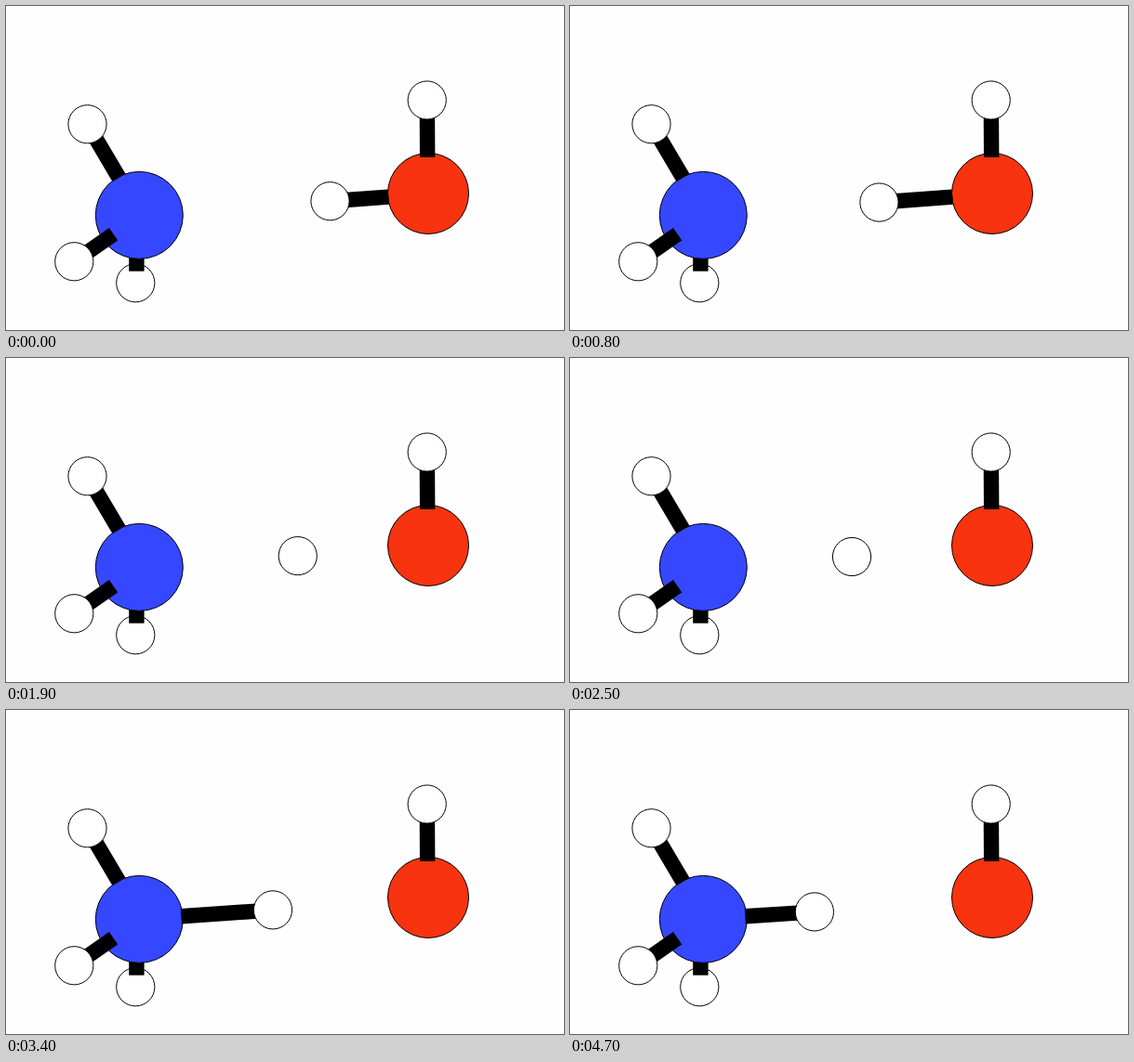
Recreate the animation shown at these times as an HTML page. Size 600 by 349 pixels, loop 4900 ms.

```html
<!DOCTYPE html>
<html lang="en">
<head>
<meta charset="utf-8">
<title>Proton transfer</title>
<style>
  html, body { margin: 0; width: 100%; height: 100%; overflow: hidden; background: #fefdff; }
  svg { display: block; width: 100%; height: 100%; }
  circle { fill: #fff; stroke: #000; stroke-width: 1; }
  line { stroke: #000; stroke-width: 16.4; }
  .nitrogen { fill: #3648ff; }
  .oxygen { fill: #f8330f; }
</style>
</head>
<body>
<svg viewBox="0 0 600 349">
  <!-- ammonia -->
  <circle cx="139.3" cy="298.3" r="20.6"/>
  <line x1="140.4" y1="260" x2="140.4" y2="285.7"/>
  <circle class="nitrogen" cx="143.3" cy="225.4" r="47"/>
  <line x1="87.5" y1="127.3" x2="121.5" y2="185"/>
  <circle cx="87.5" cy="127.3" r="20.6"/>
  <line x1="73.3" y1="275.3" x2="115.6" y2="245.7"/>
  <circle cx="73.3" cy="275.3" r="20.6"/>

  <!-- water -->
  <circle class="oxygen" cx="454" cy="202" r="43.5"/>
  <line x1="452.8" y1="101.5" x2="453.2" y2="163"/>
  <circle cx="452.7" cy="101.5" r="20.6"/>

  <!-- moving proton -->
  <line id="oldBond" x1="411.3" y1="205.6"/>
  <line id="newBond" x1="188.3" y1="222.2"/>
  <circle id="proton" r="20.6"/>
</svg>
<script>
  const LOOP = 4900, TICK = 100;
  const BREAK = 1900, FORM = 3200;
  const [proton, oldBond, newBond] =
    ['proton', 'oldBond', 'newBond'].map(id => document.getElementById(id));

  // Two moves, then one rest; the first rest comes a tick late.
  function movesAt(t) {
    const tick = Math.floor(t / TICK);
    return tick === 3 ? 3 : tick - Math.floor(tick / 3);
  }

  function attach(bond, x, y, visible) {
    bond.setAttribute('x2', x);
    bond.setAttribute('y2', y);
    bond.setAttribute('visibility', visible ? 'visible' : 'hidden');
  }

  function draw(t) {
    const n = movesAt(t);
    const x = 348.5 - 2.675 * n;
    const y = 210.2 + 0.225 * n;
    proton.setAttribute('cx', x);
    proton.setAttribute('cy', y);
    attach(oldBond, x, y, t < BREAK);
    attach(newBond, x, y, t >= FORM);
  }

  const start = performance.now();
  function frame() {
    draw((performance.now() - start) % LOOP);
    requestAnimationFrame(frame);
  }
  frame();
</script>
</body>
</html>
```
